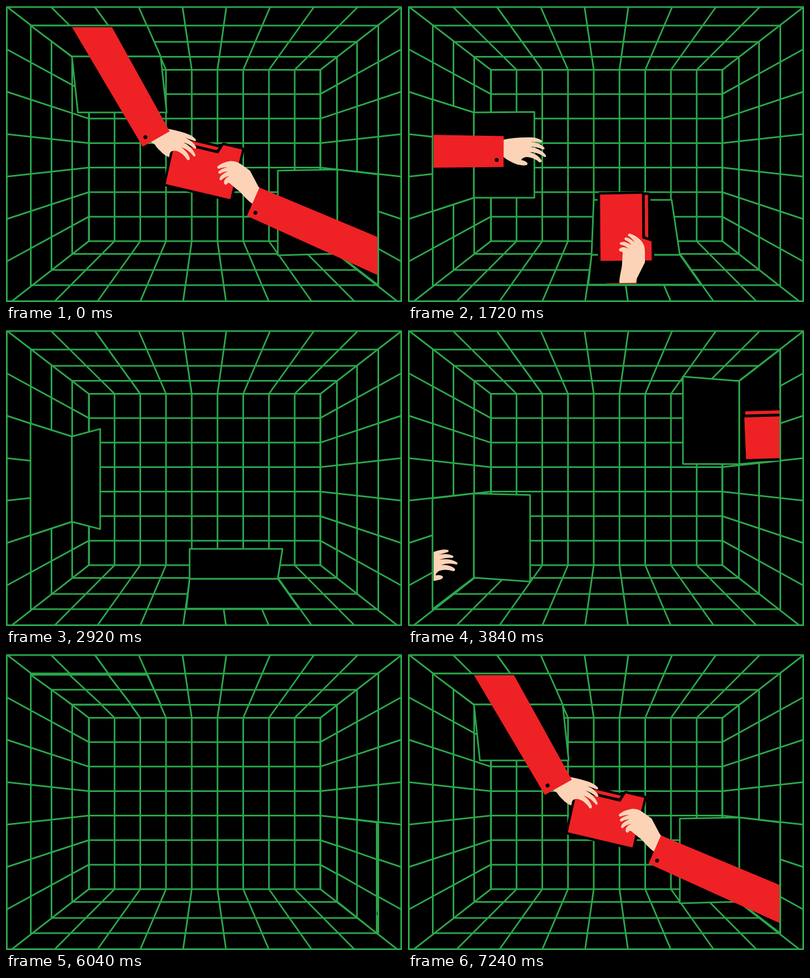
Write an HTML page with a canvas that moves like this. It is 727x545 px and loops after 7280 ms.

```html
<!DOCTYPE html>
<html lang="en">
<head>
<meta charset="utf-8">
<title>Handover</title>
<style>
  html, body { margin: 0; width: 100%; height: 100%; overflow: hidden; background: #000; }
  canvas { display: block; }
</style>
</head>
<body>
<canvas id="stage" width="727" height="545"></canvas>
<script>
const ctx = document.getElementById('stage').getContext('2d');
const LOOP = 7280, W = 727, H = 545;
const GREEN = '#2ba74b', RED = '#ee2125', SKIN = '#fcd3b7', BLACK = '#000';

// Arm parts point along +x, with the middle of the cuff at the origin.
const sleeve = new Path2D('M0,-28.5 L-600,-37 L-600,37 L0,28.5 Z');
const hands = {
  taker: {
    button: [-12.7, 15.5],
    thumb: new Path2D('M3,11 Q18,24 32,25 Q44,27 44,22 Q42,17 30,15 L20,0 Z'),
    palm: new Path2D(`M-8,-22 L0,-22 Q20,-26 40,-26 Q60,-27 69,-21 Q73,-18 68,-17 L50,-18
      Q66,-16 74,-8 Q77,-4 72,-4 Q60,-9 49,-9 Q67,-6 77,6 Q79,11 75,10 Q62,1 48,1
      Q62,5 69,15 Q71,20 66,20 Q54,10 42,10 Q34,11 32,16 L22,21 Q10,19 0,10 L-8,8 Z`)
  },
  giver: {
    button: [-12, -17],
    thumb: new Path2D('M38,3 Q52,-4 60,-13 Q66,-16 67,-11 Q66,0 54,14 Z'),
    palm: new Path2D(`M-8,-4 L0,-4 C14,-4 26,1 37,1 L52,2 Q58,3 58,-1 Q58,-6 63,-4
      Q69,2 63,13 Q68,8 70,1 Q70,-4 74,-3 Q79,4 70,18 Q76,14 79,7 Q81,4 84,7
      Q84,14 75,24 Q82,20 87,12 Q91,11 91,15 Q88,26 78,36 Q70,43 58,43 L38,43
      Q22,35 8,28 L-8,26 Z`)
  }
};
const folder = new Path2D(`M-62,-30 L20,-30 L26,-47 L61,-47 L61,47 L-61,47 Z
  M-60,-41 L19,-41 L16,-35 L-60,-35 Z`);

// Openings are clipped at their near edge: x, y, width, height of the visible side.
const sides = {
  left: [47, 0, W, H], right: [0, 0, 682, H], top: [0, 39, W, H], bottom: [0, 0, W, 511]
};

// Hatch edges: near = wall edge towards the viewer, open = free edge of the open door.
const scenes = [
  {
    start: 6020, end: 2090, folder: [363.5, 296.5, 13.3],
    giver: { side: 'right', at: [453, 360], arm: 203.6, hand: 215.7, away: [392, 150],
      near: [683, 310, 683, 514], hinge: [608, 301, 608, 456], open: [499, 303, 499, 459] },
    taker: { side: 'top', at: [276, 245.5], arm: 60.3, hand: 17, away: [-150, -260],
      near: [45, 36, 259, 36], hinge: [121, 93, 284, 93], open: [132, 196, 295, 196] }
  },
  {
    start: 1220, end: 1890, folder: [400, 294, 89.6],
    giver: { side: 'bottom', at: [392, 396], arm: 269, hand: 270, away: [0, 290],
      near: [331, 513, 538, 513], hinge: [337, 458, 499, 458], open: [341, 357, 484, 357] },
    taker: { side: 'left', at: [317, 268], arm: 0.2, hand: 0, away: [-360, 0],
      near: [45, 172, 45, 378], hinge: [121, 196, 121, 353], open: [232, 195, 232, 353] }
  },
  {
    start: 3580, end: 2100, folder: [386.5, 287.5, -1.7],
    giver: { side: 'right', at: [492.5, 269], arm: 153.8, hand: 159, away: [358, -120],
      near: [683, 36, 683, 240], hinge: [608, 94, 608, 247], open: [499, 90, 499, 247] },
    taker: { side: 'left', at: [282.5, 319], arm: -20.9, hand: -20.5, away: [-326, 158],
      near: [45, 310, 45, 514], hinge: [121, 301, 121, 456], open: [230, 303, 230, 459] }
  }
];

const progress = (t, from, to) => Math.min(1, Math.max(0, (t - from) / (to - from)));
const smooth = u => u * u * (3 - 2 * u);
const mix = (a, b, u) => a + (b - a) * u;

function line(x1, y1, x2, y2) {
  ctx.beginPath();
  ctx.moveTo(x1, y1);
  ctx.lineTo(x2, y2);
  ctx.stroke();
}

function drawRoom() {
  ctx.fillStyle = BLACK;
  ctx.fillRect(0, 0, W, H);
  ctx.strokeStyle = GREEN;
  ctx.lineWidth = 3;
  ctx.lineJoin = 'round';
  const frames = [[1.5, 2, 725.5, 543.5], [45.5, 36, 683.5, 514], [83.5, 66, 644.5, 486],
    [121.5, 93.5, 607.5, 456.5], [152.5, 117.5, 577, 433]];
  for (const [l, t, r, b] of frames) ctx.strokeRect(l, t, r - l, b - t);
  for (let i = 0; i <= 9; i++) {
    const x = 152 + i * 47.25;
    line(x, 117.5, 2.5 + i * 80.4, 2);
    line(x, 117.5, x, 433);
    line(x, 433, 9 + i * 79, 545);
  }
  for (let i = 1; i < 7; i++) {
    const y = 117 + i * 45.15, outer = 2 + i * 78;
    line(2, outer, 152, y);
    line(152, y, 577, y);
    line(577, y, 725, outer);
  }
}

// Four-cornered panel between two edges.
function panel(a, b) {
  ctx.beginPath();
  ctx.moveTo(a[0], a[1]);
  ctx.lineTo(a[2], a[3]);
  ctx.lineTo(b[2], b[3]);
  ctx.lineTo(b[0], b[1]);
  ctx.closePath();
  ctx.fill();
  ctx.stroke();
}

function drawHatch({ near, hinge, open }, angle) {
  const c = Math.cos(angle), s = Math.sin(angle);
  const free = hinge.map((h, i) => h + (near[i] - h) * c + (open[i] - h) * s);
  ctx.fillStyle = BLACK;
  panel(near, hinge);
  panel(hinge, free);
  if (angle > 0.6) return;
  // The gridded face still shows while the door has barely moved.
  const between = (e, u) => [mix(e[0], e[2], u), mix(e[1], e[3], u)];
  for (const u of [1 / 3, 2 / 3]) line(...between(hinge, u), ...between(free, u));
  line(...hinge.map((h, i) => mix(h, free[i], 0.5)));
}

function placed(side, x, y, degrees, draw) {
  ctx.save();
  ctx.beginPath();
  ctx.rect(...sides[side]);
  ctx.clip();
  ctx.translate(x, y);
  ctx.rotate(degrees * Math.PI / 180);
  draw();
  ctx.restore();
}

function fill(color, path) {
  ctx.fillStyle = color;
  ctx.fill(path);
}

function drawScene(scene, t) {
  const { end, giver, taker } = scene;
  const angle = Math.PI / 2 * smooth(progress(t, 0, 300)) * (1 - smooth(progress(t, end - 320, end)));
  drawHatch(giver, angle);
  drawHatch(taker, angle);

  const arriving = (1 - progress(t, 180, 1040)) ** 2;
  const leaving = 1.25 * progress(t, 1235, end - 200) ** 2;
  const distance = arriving + leaving;
  const shifted = (arm, [x, y]) => [x + arm.away[0] * distance, y + arm.away[1] * distance];
  const arms = [[giver, hands.giver], [taker, hands.taker]];

  for (const [arm, hand] of arms)
    placed(arm.side, ...shifted(arm, arm.at), arm.hand, () => fill(SKIN, hand.thumb));

  const holder = t < 1235 ? giver : taker;
  placed(holder.side, ...shifted(holder, scene.folder), scene.folder[2], () => {
    ctx.strokeStyle = BLACK;
    ctx.lineWidth = 9;
    ctx.stroke(folder);
    fill(RED, folder);
  });

  for (const [arm, hand] of arms) {
    const at = shifted(arm, arm.at);
    placed(arm.side, ...at, arm.hand, () => fill(SKIN, hand.palm));
    placed(arm.side, ...at, arm.arm, () => {
      fill(RED, sleeve);
      const button = new Path2D();
      button.arc(...hand.button, 3.6, 0, 2 * Math.PI);
      fill(BLACK, button);
    });
  }
}

function render() {
  const now = performance.now() % LOOP;
  drawRoom();
  for (const scene of scenes) {
    const t = (now - scene.start + LOOP) % LOOP;
    if (t < scene.end) drawScene(scene, t);
  }
  requestAnimationFrame(render);
}
render();
</script>
</body>
</html>
```
